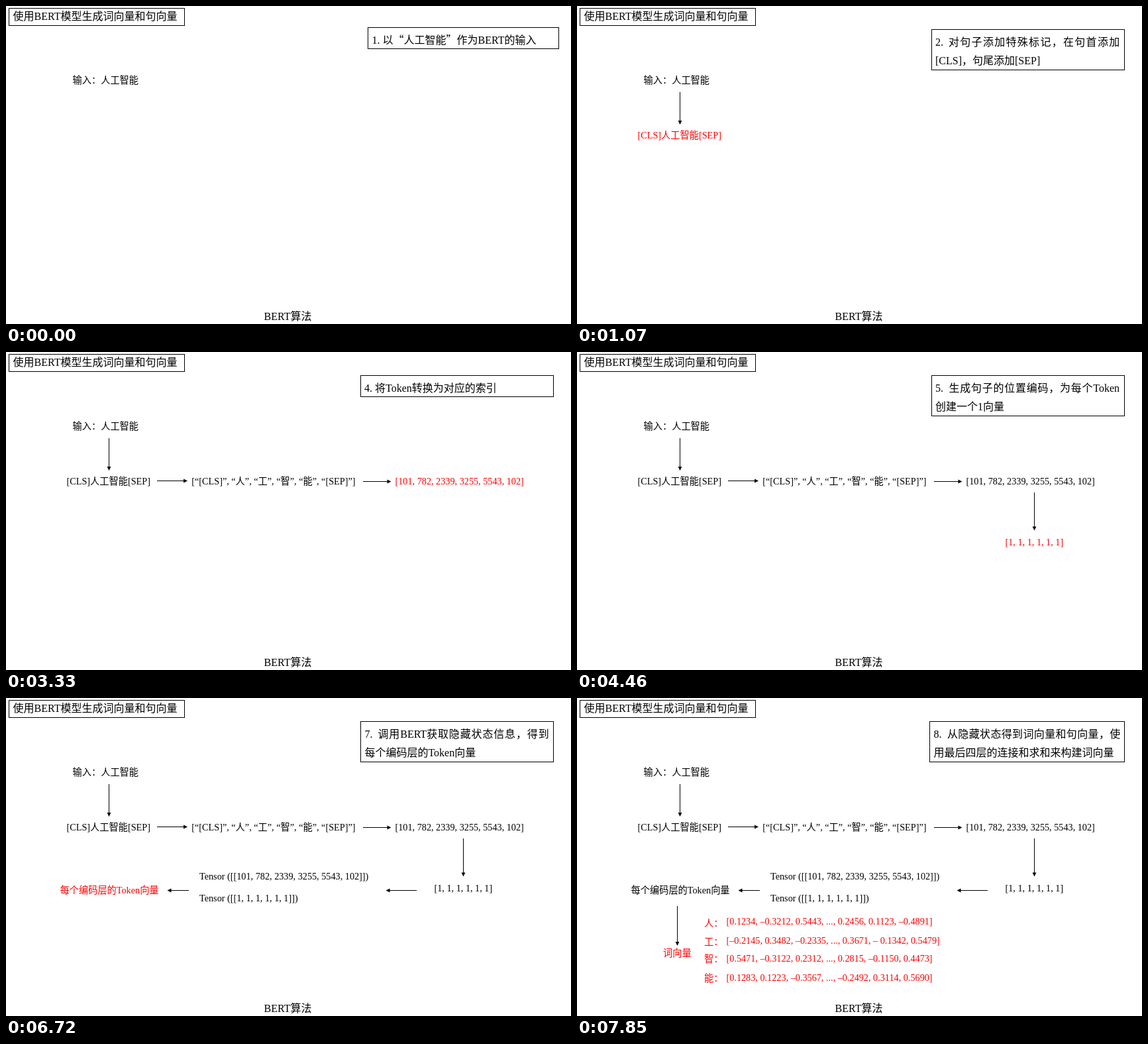
Write an HTML page that moves like this. It is 853 px wide and 480 px high and loops after 8000 ms.

```html
<!DOCTYPE html>
<html lang="zh-CN">
<head>
<meta charset="utf-8">
<title>BERT算法</title>
<style>
html, body { margin: 0; width: 100%; height: 100%; overflow: hidden; background: #fff; }
svg { display: block; width: 100%; height: 100%; }
text { font-family: "Liberation Serif", "Noto Sans CJK SC", "Noto Sans CJK", serif; font-size: 14.22px; white-space: pre; }
.big { font-size: 16px; }
.cjk { font-family: "Noto Sans CJK SC", "Noto Sans CJK", sans-serif; }
rect { fill: none; stroke: #000; }
</style>
</head>
<body>
<svg id="stage" viewBox="0 0 853 480" lang="zh-CN"></svg>
<script>
const LOOP = 8000, FIRST = 1070, STEP = 1130;
const stage = document.getElementById('stage');

const text = (x, y, s, cls = '') => `<text x="${x}" y="${y}" class="${cls}">${s}</text>`;
const big = (x, y, s) => text(x, y, s, 'big');
const box = (l, t, r, b) => `<rect x="${l + .5}" y="${t + .5}" width="${r - l}" height="${b - t}"/>`;
// Adds the gap of a justified line to its Chinese runs only
const spread = (s, gap) => s.replace(/[\u4e00-\u9fa5，]+/g, m => `<tspan letter-spacing="${gap}">${m}</tspan>`);

function arrow(x1, y1, x2, y2) {
  const len = Math.hypot(x2 - x1, y2 - y1);
  const angle = Math.atan2(y2 - y1, x2 - x1) * 180 / Math.PI;
  return `<g transform="translate(${x1} ${y1}) rotate(${angle})">` +
    `<path d="M0 0H${len - 4}" stroke="#000"/><path d="M${len} 0l-6-2.9v5.8z"/></g>`;
}

function note(left, num, numX, line1, x1, gap, line2) {
  return box(left, 35, 826, line2 ? 96 : 67) + big(numX, 60, num) +
    big(x1, 60, spread(line1, gap)) + (line2 ? big(numX, 88, line2) : '');
}

const notes = [
  box(546, 32, 834, 64) + big(552.5, 57, '1. 以<tspan class="cjk">“人工智能”</tspan>作为BERT的输入'),
  note(535, '2.', 541, '对句子添加特殊标记，在句首添加', 561, 1.3, '[CLS]，句尾添加[SEP]'),
  note(530, '3.', 536.5, 'Token初始化，对添加了标记的句子进', 556, 0, '行记号化'),
  note(535, '4.', 541, '将Token转换为对应的索引', 557, 0),
  note(535, '5.', 541, '生成句子的位置编码，为每个Token', 561.5, .75, '创建一个1向量'),
  note(534, '6.', 541, '将向量转换为Torch张量', 557, 0),
  note(535, '7.', 541.4, '调用BERT获取隐藏状态信息，得到', 561.5, .85, '每个编码层的Token向量'),
  note(532, '8.', 538.4, '从隐藏状态得到词向量和句向量，使', 559, .35, '用最后四层的连接和求和来构建词向量')
];

const ids = '101, 782, 2339, 3255, 5543, 102', ones = '1, 1, 1, 1, 1, 1';
const quoted = ['[CLS]', ...'人工智能', '[SEP]'].map(s => `“${s}”`).join(', ');
const rows = [
  ['人', '0.1234, –0.3212, 0.5443, ..., 0.2456, 0.1123, –0.4891', 345, 342],
  ['工', '–0.2145, 0.3482, –0.2335, ..., 0.3671, – 0.1342, 0.5479', 373, 371],
  ['智', '0.5471, –0.3122, 0.2312, ..., 0.2815, –0.1150, 0.4473', 399, 398],
  ['能', '0.1283, 0.1223, –0.3567, ..., –0.2492, 0.3114, 0.5690', 428, 427]
];

// Text that each step adds; it is red while its step is current
const labels = [
  '',
  text(91.5, 200, '[CLS]人工智能[SEP]'),
  text(280.3, 200, `[${quoted}]`),
  text(587.5, 200, `[${ids}]`),
  text(646.5, 292, `[${ones}]`),
  text(292, 274, `Tensor ([[${ids}]])`) + text(292, 307, `Tensor ([[${ones}]])`),
  text(81.5, 295, '每个编码层的Token向量'),
  text(130, 390, '词向量') + rows.map(([c, v, y1, y2]) => text(192, y1, c + '：') + text(225.5, y2, `[${v}]`)).join('')
];

// Arrow that leads to each step's text
const arrows = [
  () => '',
  () => arrow(155.5, 130, 155.5, 179),
  n => arrow(n > 2 ? 228 : 226, 194.5, 274, 194.5),
  () => arrow(539, 195.5, 581.5, 195.5),
  () => arrow(690.5, 212, 690.5, 269.5),
  n => arrow(n > 5 ? 620 : 630, 290.5, 573.5, 290.5),
  () => arrow(276, 290.5, 243.5, 290.5),
  () => arrow(151.5, 314, 151.5, 374)
];

const fixed = box(4, 3, 269, 29) + big(10.5, 21, '使用BERT模型生成词向量和句向量') +
  text(100.5, 117, '输入：人工智能') + big(389.5, 474, 'BERT算法');

let shown = -1;
function draw(t) {
  const n = t < FIRST ? 0 : 1 + Math.floor((t - FIRST) / STEP);
  if (n === shown) return;
  shown = n;
  let out = fixed + notes[n];
  for (let i = 1; i <= n; i++) {
    out += arrows[i](n) + `<g fill="${i === n ? '#f00' : '#000'}">${labels[i]}</g>`;
  }
  stage.innerHTML = out;
}

const start = performance.now();
function tick() {
  draw((performance.now() - start) % LOOP);
  requestAnimationFrame(tick);
}
tick();
</script>
</body>
</html>
```
